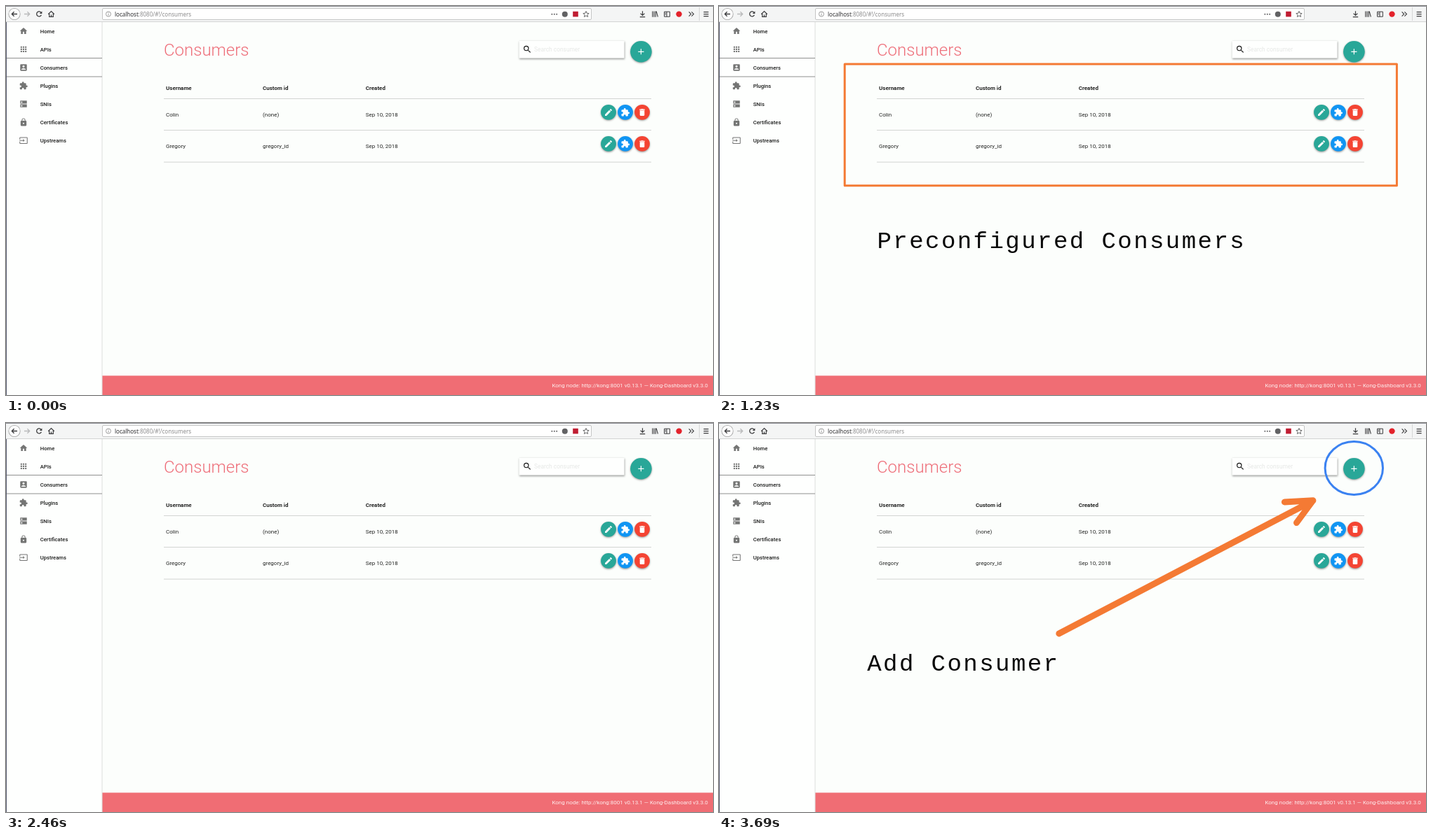
These frames come from a looping animation (1008x556 px, 4.1 s). An HTML page with a canvas:

```html
<!DOCTYPE html>
<html lang="en">
<head>
<meta charset="utf-8">
<title>Consumers</title>
<style>
html, body { margin: 0; width: 100%; height: 100%; overflow: hidden; background: #fcfefc; }
canvas { display: block; }
</style>
</head>
<body>
<canvas id="stage" width="1008" height="556"></canvas>
<script>
const ctx = document.getElementById('stage').getContext('2d');
const STEP = 410, LOOP = 4100;
const BLUE = '#3b82f1', ORANGE = '#f47a34', TEAL = '#29a798';
const ROBOTO = 'Roboto, sans-serif';

// Icons on a 24-unit grid
const ring = (x, y, r) => `M${x - r} ${y}a${r} ${r} 0 1 0 ${2 * r} 0a${r} ${r} 0 1 0 ${-2 * r} 0z`;
const dots = [4, 10, 16].flatMap(x => [4, 10, 16].map(y => `M${x} ${y}h4v4h-4z`)).join('');
const shape = d => new Path2D(d);
const icons = {
  home: shape('M10 20v-6h4v6h5v-8h3L12 3 2 12h3v8z'),
  apps: shape(dots),
  person: shape('M5 3h14a2 2 0 0 1 2 2v14a2 2 0 0 1-2 2H5a2 2 0 0 1-2-2V5a2 2 0 0 1 2-2z' + ring(12, 9, 3) +
    'M6 18h12v-1c0-2-4-3.1-6-3.1s-6 1.1-6 3.1z'),
  plugin: shape('M20.5 11H19V7a2 2 0 0 0-2-2h-4V3.5a2.5 2.5 0 0 0-5 0V5H4a2 2 0 0 0-2 2v3.8h1.5a2.7 2.7 0 0 1 0 5.4H2V20' +
    'a2 2 0 0 0 2 2h3.8v-1.5a2.7 2.7 0 0 1 5.4 0V22H17a2 2 0 0 0 2-2v-4h1.5a2.5 2.5 0 0 0 0-5z'),
  server: shape('M3 3h18v8H3zM3 13h18v8H3z' + ring(7, 7, 2) + ring(7, 17, 2)),
  lock: shape('M7 8V6a5 5 0 0 1 10 0v2h1a2 2 0 0 1 2 2v10a2 2 0 0 1-2 2H6a2 2 0 0 1-2-2V10a2 2 0 0 1 2-2z' +
    'M8.9 8h6.2V6a3.1 3.1 0 0 0-6.2 0z' + ring(12, 15, 2)),
  input: shape('M1 9V5a2 2 0 0 1 2-2h18a2 2 0 0 1 2 2v14a2 2 0 0 1-2 2H3a2 2 0 0 1-2-2v-4h2v4h18V5H3v4z' +
    'M11 16l4-4-4-4v3H1v2h10z'),
  search: shape(ring(9.5, 9.5, 6.5) + ring(9.5, 9.5, 4.5) + 'M14 15.5l5 5 1.5-1.5-5-5h-.8l-.7.7z'),
  edit: shape('M3 17.25V21h3.75L17.8 9.95 14.05 6.2zM20.7 7.04a1 1 0 0 0 0-1.41l-2.34-2.34a1 1 0 0 0-1.41 0l-1.83 1.83 3.75 3.75z'),
  trash: shape('M6 19a2 2 0 0 0 2 2h8a2 2 0 0 0 2-2V7H6zM19 4h-3.5l-1-1h-5l-1 1H5v2h14z'),
  add: shape('M19 13h-6v6h-2v-6H5v-2h6V5h2v6h6z')
};

function icon(name, x, y, scale, color) {
  ctx.save();
  ctx.translate(x - 12 * scale, y - 12 * scale);
  ctx.scale(scale, scale);
  ctx.fillStyle = color;
  ctx.fill(icons[name], 'evenodd');
  ctx.restore();
}

function box(x, y, w, h, color) {
  ctx.fillStyle = color;
  ctx.fillRect(x, y, w, h);
}

function text(str, x, y, font, color, align = 'left') {
  ctx.font = font;
  ctx.fillStyle = color;
  ctx.textAlign = align;
  ctx.fillText(str, x, y);
}

function line(d, color, width = 1.2) {
  ctx.strokeStyle = color;
  ctx.lineWidth = width;
  ctx.stroke(new Path2D(d));
}

function disc(x, y, r, color) {
  ctx.fillStyle = color;
  ctx.beginPath();
  ctx.arc(x, y, r, 0, 7);
  ctx.fill();
}

function raised(draw, alpha = 0.4) {
  ctx.save();
  ctx.shadowColor = `rgba(0,0,0,${alpha})`;
  ctx.shadowOffsetY = 1.1;
  ctx.shadowBlur = 2.6;
  draw();
  ctx.restore();
}

function drawToolbar() {
  const dark = '#3c3c3e';
  box(0, 0, 1008, 22, '#f4f5f5');
  box(0, 0, 1008, 1, '#8b8c92');
  box(0, 22, 1008, 1, '#d2d3d3');

  disc(12, 11.5, 8.6, '#a2a2a2');
  disc(12, 11.5, 7.8, '#fcfcfc');
  line('M16 11.5H8.4M11.6 8.2L8.3 11.5l3.3 3.3', dark, 1.3);
  line('M26 11.5h7.6M30.4 8.2l3.3 3.3-3.3 3.3', '#b9babb', 1.3);
  line('M50.2 9.6A3.5 3.5 0 1 0 50.4 12.8', dark, 1.3);
  ctx.fillStyle = dark;
  ctx.fill(new Path2D('M51.4 7.4v3.7h-3.7z'));
  line('M60.2 11.8l4.3-4.2 4.3 4.2M61.7 11v4.4h5.6V11M64.5 15.4v-2.8', dark);

  ctx.beginPath();
  ctx.roundRect(137.5, 3.5, 697, 16, 1.5);
  ctx.fillStyle = '#fff';
  ctx.fill();
  ctx.strokeStyle = '#c4c5c5';
  ctx.lineWidth = 1;
  ctx.stroke();
  line(ring(146, 11.5, 3.5) + 'M146 11v2.5M146 9.3v1', '#828282', 0.8);
  const font = '8px "Noto Sans", sans-serif';
  text('localhost', 155, 14.8, font, '#2c2c2e');
  text(':8080/#!/consumers', 155 + ctx.measureText('localhost').width, 14.8, font, '#8b8b8c');

  for (const x of [778.4, 781.8, 785.2]) disc(x, 11.7, 1, '#606062');
  disc(796.8, 11.7, 4, '#626264');
  box(808.2, 7.8, 7.6, 7.6, '#c01d32');
  const star = Array.from({ length: 10 }, (_, i) => {
    const a = i * Math.PI / 5, r = i % 2 ? 2 : 4.4;
    return `${827 + r * Math.sin(a)} ${11.9 - r * Math.cos(a)}`;
  });
  line('M' + star.join('L') + 'z', '#58585a', 0.9);

  line('M907.5 7.2v6M904.6 10.6l2.9 2.9 2.9-2.9M903.8 15.7h7.4', dark);
  line('M921.8 7.5v8.2M924 7.5v8.2M926.2 7.5v8.2M927.2 7.7l2.2 7.8', dark, 1.1);
  line('M938.6 8.2h7.8v7h-7.8zM942 8.2v7M939.6 10.2h1.6M939.6 12h1.6', dark, 1);
  disc(959.5, 11.6, 4.2, '#e3222b');
  line('M973.6 8.4l3.1 3.1-3.1 3.1M977.4 8.4l3.1 3.1-3.1 3.1', dark, 1.1);
  box(988, 2, 1, 19, '#d6d7d7');
  line('M994.6 8.6h7M994.6 11.6h7M994.6 14.6h7', dark, 1.1);
}

const menu = [
  ['home', 'Home'], ['apps', 'APIs'], ['person', 'Consumers'], ['plugin', 'Plugins'],
  ['server', 'SNIs'], ['lock', 'Certificates'], ['input', 'Upstreams']
];

function drawSidebar() {
  box(0, 23, 137, 533, '#fefffe');
  box(136.5, 23, 1, 533, '#dcdedc');
  menu.forEach(([name, label], i) => {
    const y = 35.8 + i * 26.07;
    icon(name, 25, y, 0.525, '#747574');
    text(label, 48.7, y + 2.8, '500 7.65px ' + ROBOTO, '#1c1d1c');
  });
  box(0, 74, 137, 1, '#8f908f');
  box(0, 100.5, 137, 1, '#8f908f');
  box(0, 0, 1, 556, '#55586e');
}

const people = [['Colin', '(none)'], ['Gregory', 'gregory_id']];
const columns = [228, 366, 512.7];

function drawRow(cells, y, weight) {
  cells.forEach((cell, i) => text(cell, columns[i], y, `${weight} 8px ${ROBOTO}`, '#242524'));
}

function drawContent() {
  text('Consumers', 225, 71.3, '300 24px ' + ROBOTO, '#ee6e79');

  raised(() => box(731.5, 50, 150, 24.5, '#fefffe'));
  icon('search', 743.2, 62, 0.57, '#111');
  text('Search consumer', 753, 65, '8.4px ' + ROBOTO, '#e6e8e6');
  raised(() => disc(905.4, 65.2, 15.3, TEAL));
  icon('add', 905.4, 65.3, 0.58, '#fff');

  drawRow(['Username', 'Custom id', 'Created'], 120.1, 700);
  people.forEach(([name, id], i) => {
    const y = 152 + i * 45.1;
    drawRow([name, id, 'Sep 10, 2018'], y + 5.5, 400);
    [['edit', TEAL], ['plugin', '#1095f3'], ['trash', '#f44433']].forEach(([sign, color], k) => {
      const x = 859 + k * 24;
      raised(() => disc(x, y - 0.2, 10.9, color));
      icon(sign, x, y, 0.55, '#fff');
    });
  });
  for (const y of [132, 177, 222.6]) box(225, y, 695, 1, '#d3d5d3');

  box(137, 528.4, 871, 27.6, '#f06d74');
  text('Kong node: http://kong:8001 v0.13.1 — Kong-Dashboard v3.3.0', 1000.8, 545.2,
    '8px ' + ROBOTO, '#fdeeee', 'right');
}

function caption(str, x, y) {
  ctx.letterSpacing = '2.45px';
  text(str, x, y, '34px "Liberation Mono", "Courier New", monospace', '#080808');
  ctx.letterSpacing = '0px';
}

function drawFrame(color) {
  ctx.strokeStyle = color;
  ctx.lineWidth = 3;
  ctx.strokeRect(179.2, 83.1, 787.2, 173.6);
}

function drawPointer(circleColor, arrowColor) {
  ctx.strokeStyle = circleColor;
  ctx.lineWidth = 3;
  ctx.beginPath();
  ctx.ellipse(905.3, 64.5, 41.2, 37.9, 0, 0, 7);
  ctx.stroke();
  line('M484.7 301L847 111M806.3 113L847 110.7 823.4 142.6', arrowColor, 8.8);
}

function draw(now) {
  const step = Math.floor((now % LOOP) / STEP);
  ctx.lineCap = 'butt';
  ctx.lineJoin = 'miter';
  box(0, 0, 1008, 556, '#fcfefc');
  drawContent();
  drawSidebar();
  drawToolbar();

  ctx.lineCap = ctx.lineJoin = 'round';
  if (step >= 1 && step <= 5) caption('Preconfigured Consumers', 225.5, 346.3);
  if (step >= 2 && step <= 5) drawFrame(step % 2 ? ORANGE : BLUE);
  if (step >= 7) caption('Add Consumer', 211.2, 354.2);
  if (step === 8) drawPointer(ORANGE, BLUE);
  if (step === 9) drawPointer(BLUE, ORANGE);
}

const start = performance.now();
function tick() {
  draw(performance.now() - start);
  requestAnimationFrame(tick);
}
tick();
</script>
</body>
</html>
```
